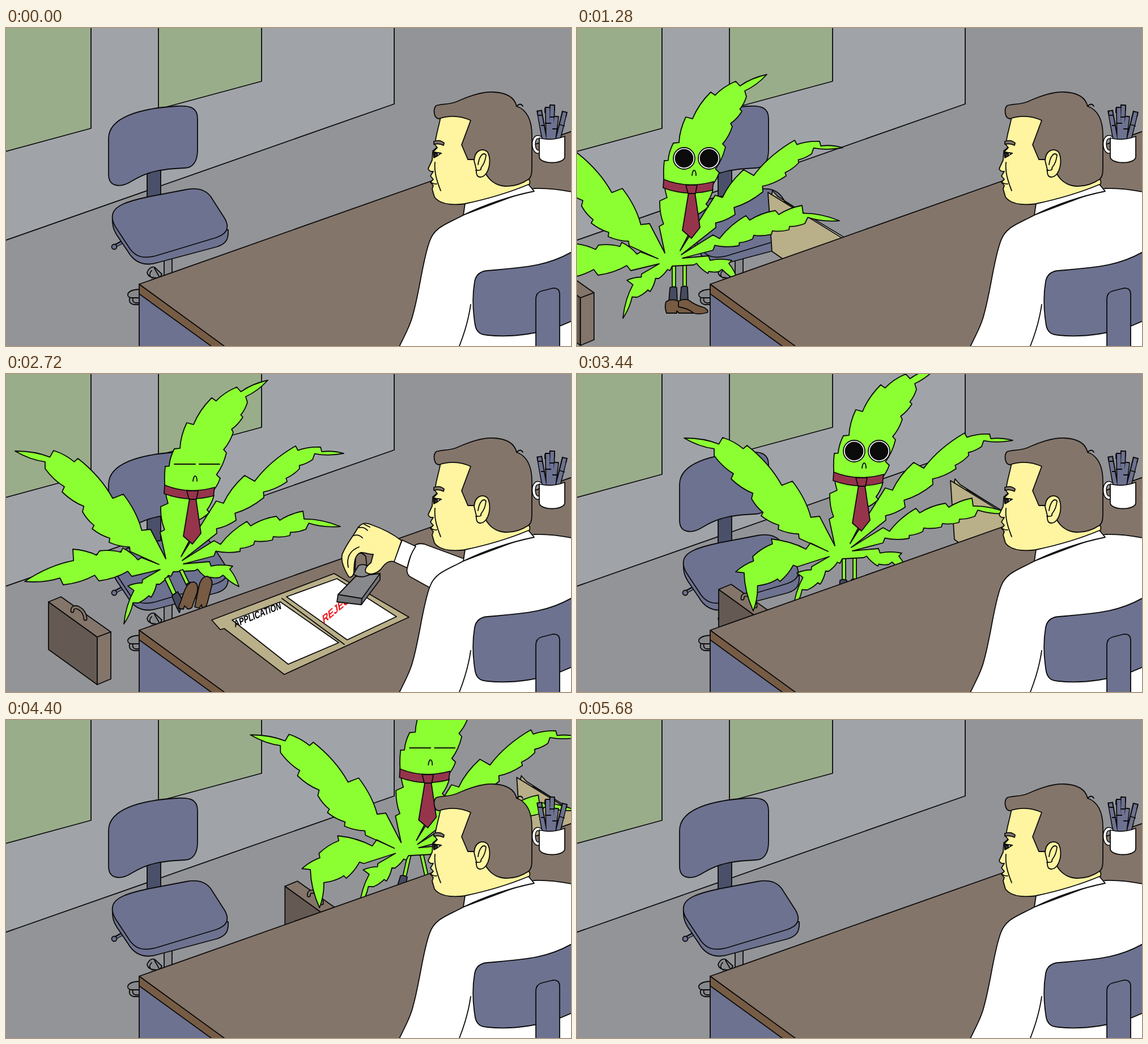
Recreate the animation shown at these times as an HTML page. Size 997 by 561 pixels, loop 5760 ms.

```html
<!DOCTYPE html>
<html lang="en">
<head>
<meta charset="utf-8">
<title>Job interview</title>
<style>
html, body { margin: 0; width: 100%; height: 100%; overflow: hidden; background: #939498; }
svg { display: block; width: 100vw; height: 100vh; stroke: #0b0b0b; stroke-width: 1.8; stroke-linejoin: round; stroke-linecap: round; }
text { stroke: none; font-family: "Liberation Sans", sans-serif; font-weight: bold; }
.line { fill: none; }
.blue { fill: #6d7290; }
.brown { fill: #84756a; }
.skin { fill: #fff4a0; }
.white { fill: #fff; }
.tan { fill: #b9af88; }
.green { fill: #8cff33; }
.red { fill: #96344c; }
.grey { fill: #88898d; }
.shoe { fill: #775b43; }
.sock { fill: #474b60; }
.window { fill: #9aad8b; }
</style>
</head>
<body>
<svg viewBox="0 0 997 561" preserveAspectRatio="none">
  <!-- room -->
  <path fill="#939498" stroke="none" d="M0 0H997V561H0Z"/>
  <path fill="#a0a4a9" d="M-5 -5H685V134L-5 376Z"/>
  <path class="window" d="M-5 -5H150V177L-5 219Z"/>
  <path class="window" d="M269 -5H451V94L269 143Z"/>

  <!-- empty chair -->
  <path class="grey" d="M279 405L293 402V440H279Z"/>
  <path class="grey" d="M249 431Q254 420 262 422L275 434L271 442L258 440Q250 438 249 431ZM257 428Q250 436 258 441M262 424L270 438"/>
  <path class="grey" d="M215 469Q219 461 238 461V476L221 476Q214 475 215 469ZM218 477Q216 486 226 488H238V476M224 476Q222 483 228 485H238"/>
  <path class="line" d="M193 384L208 376" stroke-width="6"/>
  <path class="line" d="M194 384L209 376" stroke-width="3" style="stroke:#6d7290"/>
  <circle class="blue" cx="191" cy="386" r="4.5"/>
  <path fill="#4b506a" d="M249 250H273V300H249Z"/>
  <path class="blue" d="M181 195C181 158 235 142 300 138C326 136 338 141 338 160V215C338 235 330 247 315 247C270 249 248 254 222 270C205 281 181 283 181 258Z"/>
  <path class="blue" d="M188 330C187 347 189 355 196 366L215 394C226 413 243 421 267 414L372 386C388 381 393 373 392 356Z"/>
  <path class="blue" d="M188 330C190 314 213 306 250 298L318 285C340 281 352 286 361 297L386 336C396 354 388 364 370 370L264 402C240 408 228 402 219 390L194 352C188 343 187 336 188 330Z"/>

  <!-- applicant -->
  <g id="applicant">
    <g id="case">
      <path fill="#645a53" d="M75 402L161 464V548L75 486Z"/>
      <path class="brown" d="M75 402L97 393L185 455L161 464Z"/>
      <path class="brown" d="M161 464L185 455V538L161 548Z"/>
      <path class="line" stroke-width="7" d="M117 418C117 404 140 414 140 432"/>
      <path class="line" stroke-width="3.5" style="stroke:#84756a" d="M117 418C117 404 140 414 140 432"/>
    </g>
    <g id="folder">
      <path class="tan" d="M342 302L345 287L354 297L472 372V470Z"/>
      <path class="white" d="M361 308L366 306L471 369V380Z"/>
      <path class="tan" d="M337 290L472 373V483L344 394Z"/>
    </g>
    <g id="standing">
      <g id="legL">
        <path class="green" d="M168 410H174V460H168Z"/>
        <path class="sock" d="M164 458Q170 455 176 458L177 484H162Z"/>
        <path class="shoe" d="M157 483Q166 477 177 481Q188 490 206 493Q214 497 212 503H180L176 499V503H158Q154 492 157 483Z"/>
      </g>
      <g id="legR">
        <path class="green" d="M187 410H193V458H187Z"/>
        <path class="sock" d="M184 457Q190 454 195 457L196 481H182Z"/>
        <path class="shoe" d="M179 482Q187 477 197 480Q208 489 224 493Q233 498 230 502Q215 506 206 503Q195 494 179 492Z"/>
      </g>
    </g>
    <path id="leaf" class="green"/>
    <g id="seated" transform="translate(-127 71)">
      <path class="green" d="M280 361L287 357L300 386L294 390ZM306 347L312 345L323 368L318 372Z"/>
      <path class="sock" d="M293 391L303 384L312 400L306 421Q297 405 293 391ZM318 371L325 367L335 384L328 392Z"/>
      <path class="shoe" d="M333 411L341 372Q346 356 356 357Q366 362 363 374L355 405Q352 414 346 412L345 407L341 413Z"/>
      <path class="shoe" d="M304 413L314 385Q321 366 332 367Q341 371 337 386L328 412Q321 417 318 412L315 409L313 415Z"/>
    </g>
    <path class="red" d="M153 267Q194 284 241 271L239 286Q194 298 152 282Z"/>
    <path class="red" d="M197 290H208L217 352L202 371L186 357Z"/>
    <path class="red" d="M192 277H212L209 292H196Z"/>
    <path class="line" d="M203 260Q204 251 207 251Q210 252 210 260"/>
    <g id="open">
      <g class="white"><circle cx="189" cy="230" r="19"/><circle cx="233" cy="230" r="19"/></g>
      <g fill="#0b0b0b"><circle cx="189" cy="230" r="15.5"/><circle cx="233" cy="230" r="15.5"/></g>
    </g>
    <path id="shut" class="line" d="M170 230H207M214 230H250"/>
  </g>

  <!-- desk -->
  <path class="blue" d="M235 460L400 580H235Z"/>
  <path class="brown" d="M235 452L1002 181V580H410Z"/>
  <path fill="#775c45" d="M235 452L411 580H388L235 469Z"/>

  <g id="papers">
    <path class="tan" d="M363 434L376 429L579 352L711 429L491 530L385 449L378 451Z"/>
    <path class="line" d="M487 396L597 477"/>
    <path class="white" d="M399 434L484 402L587 474L498 512Z"/>
    <path class="white" d="M495 393L584 361L689 428L602 469Z"/>
    <text transform="matrix(.82 -.33 .25 1.15 404 447)" font-size="15">APPLICATION</text>
    <text id="verdict" transform="matrix(.77 -.64 .2 1.1 560 441)" font-size="18" fill="#f5141a">REJECTED</text>
  </g>

  <!-- stamping arm -->
  <g id="arm">
    <path class="white" d="M718 306Q724 297 738 300L830 334L790 395L748 377L712 357Q706 351 708 342Z"/>
    <path class="white" d="M699 293L723 304Q712 320 708 342L684 331Z"/>
    <path class="brown" d="M616 345L617 322Q625 310 635 322L637 345Z"/>
    <path fill="#737478" d="M584 402L586 389L660 352V363L627 407Z"/>
    <path class="grey" d="M586 389L617 357L660 352L628 396ZM628 396L627 407"/>
    <path class="grey" d="M613 353L622 338Q632 333 640 341L641 354Q626 362 613 353Z"/>
    <path class="skin" d="M605 358C597 345 591 330 593 319C600 300 612 288 621 271C628 262 637 262 645 266C665 273 684 283 698 294L685 331C675 328 668 335 661 345C652 353 643 355 635 350C632 344 638 337 644 333L648 318C641 319 632 314 626 315C616 318 614 331 614 350Q612 360 605 358Z"/>
    <path class="line" d="M604 341C600 322 608 311 623 305M614 285Q622 282 629 289M622 271Q632 269 638 276M632 265L642 270"/>
  </g>

  <!-- interviewer -->
  <path class="white" d="M690 570C706 538 714 522 718 506C731 460 735 409 748 375C757 350 780 345 807 330L932 283Q965 282 1002 290V570Z"/>
  <path class="skin" d="M768 150C765 173 758 188 757 206L761 211L753 219L752 233L745 248Q747 254 754 253L749 261L754 267L749 272L754 278L752 284L756 298C765 311 788 313 812 310Q870 299 923 277Q928 267 915 262L880 150Z"/>
  <path class="white" d="M807 330L810 310Q872 297 922 276L932 288Q868 301 807 330Z"/>
  <path class="brown" d="M764 160C755 160 753 143 759 137C770 133 780 136 795 130C815 121 838 112 860 113C882 114 897 121 901 138C921 145 928 165 928 190V240C928 255 928 262 922 267C910 275 895 280 880 279C865 278 853 269 846 256L826 232L815 232L804 206L820 163C805 156 785 153 764 160Z"/>
  <path class="line" d="M901 138Q908 131 912 138"/>
  <path class="skin" d="M826 234C827 216 840 211 849 218C858 230 853 262 837 263Q829 263 830 250Z"/>
  <path class="line" d="M833 241C835 226 842 218 847 224Q846 237 838 247Q840 252 829 251"/>
  <path class="brown" d="M755 200Q766 196 773 203L772 207Q764 203 755 205Z"/>
  <path class="white" d="M754 219L768 221L755 229Z"/>
  <path fill="#333" d="M756 221H761V226L756 228Z"/>
  <path class="line" d="M753 217L760 211M754 219L768 221M757 237C755 256 762 274 767 287M749 272Q756 276 760 275"/>
  <path class="line" d="M820 488Q815 523 800 561"/>
  <path class="blue" d="M1002 393C960 418 925 422 850 428C835 429 829 437 827 447C823 470 823 495 828 525C831 538 838 541 850 542C890 546 950 541 1002 515Z"/>
  <path class="blue" d="M935 570V478Q935 467 945 464L965 459Q977 458 977 470V570Z"/>

  <!-- mug -->
  <g class="line" stroke-linecap="butt">
    <path id="pens" stroke-width="10" d="M950 196L941 145M957 196L956 139M962 196L964 135M966 196L971 155M974 196L986 147"/>
    <use href="#pens" style="stroke:#6d7290" transform="translate(0 1.5)" id="ink"/>
    <path stroke-width="6.5" style="stroke:#6d7290" d="M950 196L941 147M957 196L956 141M962 196L964 137M966 196L971 157M974 196L986 149"/>
    <path d="M938 154H947M944 172H951M951 168H962M959 157H968M964 178H974M976 170L986 173M938 146V153M951 141V150M968 137V146M990 148L988 157"/>
  </g>
  <path class="line" stroke-width="7" d="M943 194C927 184 928 226 943 217"/>
  <path class="line" stroke-width="4" style="stroke:#fff" d="M943 194C927 184 928 226 943 217"/>
  <path class="white" d="M941 194V227C941 241 986 241 986 227V191Q963 200 941 194Z"/>
</svg>
<script>
const $ = id => document.getElementById(id);
const LOOP = 5760, STEP = 80;
$('ink').remove();

const points = s => s.split(' ').map(p => p.split(',').map(Number));

// Inner corner beside tooth p, on the way to q
function notch([px, py], [qx, qy], side) {
  const dx = qx - px, dy = qy - py;
  return [px + .1 * dx - side * .17 * dy, py + .1 * dy + side * .17 * dx];
}
const bend = (a, b) => `Q${(a[0] + b[0]) / 2} ${(a[1] + b[1]) / 2} `;

// One toothed leaflet: valley to tip, then tip to the next valley
function leaflet(rise, fall) {
  const up = points(rise), down = [up.at(-1), ...points(fall)];
  let d = '';
  for (let i = 1; i < up.length; i++) {
    if (i > 1) d += 'L' + notch(up[i - 1], up[i], 1);
    d += bend(up[i - 1], up[i]) + up[i];
  }
  for (let i = 1; i < down.length; i++) {
    const a = down[i - 1], b = down[i];
    d += bend(a, b);
    d += i < down.length - 1 ? notch(b, a, -1) + 'L' + b : b;
  }
  return d;
}

const foot = 'M168,420' + leaflet('168,420 164,428 144,442 129,465 106,475 81,512', '88,445 114,434 145,416');
const handOut = leaflet('145,416 95,428 37,436 -26,443 -94,437', '-9,380 38,383 79,378 112,395 143,407');
const handDown = leaflet('145,416 89,434 58,460 28,466 11,512', '-20,443 10,416 43,385 112,392 143,407');
const rest =
  leaflet('143,407 92,384 55,368 25,344 8,314 -28,279 -58,238 -111,207', '-43,206 0,220 80,283 128,345 155,397') +
  leaflet('155,397 145,350 146,305 154,234 170,203 192,157 236,113 280,94 335,82',
    '299,121 291,147 274,174 262,210 251,255 240,285 232,315 212,335 182,393') +
  leaflet('182,393 244,295 294,250 384,198 428,200 469,211', '414,222 391,238 369,261 328,289 279,329 245,352 184,400') +
  leaflet('184,400 240,365 298,331 350,322 397,313 463,340', '402,345 374,356 343,364 310,372 286,384 240,392 186,406') +
  leaflet('186,406 232,402 273,410 284,446', '250,430 231,433 206,418 168,420') + 'Z';

// Straight moves between [time, x, y] keys
function track(t, keys) {
  let a = keys[0];
  for (const b of keys) {
    if (t < b[0]) {
      const k = Math.max(0, (t - a[0]) / (b[0] - a[0] || 1));
      return [a[1] + (b[1] - a[1]) * k, a[2] + (b[2] - a[2]) * k];
    }
    a = b;
  }
  return [a[1], a[2]];
}

const walk = [[80, -468, 122], [640, -226, 59], [1160, 0, 0], [1440, 0, 0], [1840, 127, -71],
  [2960, 127, -71], [3360, 300, -94], [3840, 300, -94], [5680, 1096, -379]];
const luggage = [[1440, -155, 12], [1840, -127, 71], [2960, -127, 71], [3360, -125, 72]];
const stamping = [[2240, 190, 60], [2560, -25, 30], [2640, -25, 30], [2720, 0, 0], [2960, 190, 60]];

const move = (id, [x, y]) => $(id).setAttribute('transform', `translate(${x} ${y})`);
const show = (id, on) => $(id).style.display = on ? '' : 'none';
const within = (t, from, to) => t >= from && t < to;

function draw(now) {
  const t = Math.floor(now % LOOP / STEP) * STEP;
  const sitting = within(t, 1680, 3040), onDesk = within(t, 1920, 3040);
  const blink = within(t, 2640, 2800) || within(t, 4320, 4480);

  move('applicant', track(t, walk));
  move('case', track(t, luggage));
  move('folder', t < 3040 ? [0, 0] : [22, -8]);
  move('arm', track(t, stamping));
  $('leaf').setAttribute('d', foot + (t < 3120 ? handOut : handDown) + rest);

  let swing = 0;
  if (t < 1160) swing = -18 * Math.sin((t - 1160) / 640 * 2 * Math.PI);
  if (t > 3840) swing = 18 * Math.sin((t - 3840) / 640 * 2 * Math.PI);
  $('legL').setAttribute('transform', `rotate(${-swing} 171 412)`);
  $('legR').setAttribute('transform', `rotate(${swing} 190 412)`);

  show('applicant', within(t, 80, 5680));
  show('standing', !sitting);
  show('seated', sitting);
  show('folder', !onDesk);
  show('papers', onDesk);
  show('verdict', t >= 2640);
  show('arm', within(t, 2320, 2960));
  show('open', !blink);
  show('shut', blink);
  requestAnimationFrame(() => draw(performance.now()));
}
draw(performance.now());
</script>
</body>
</html>
```
